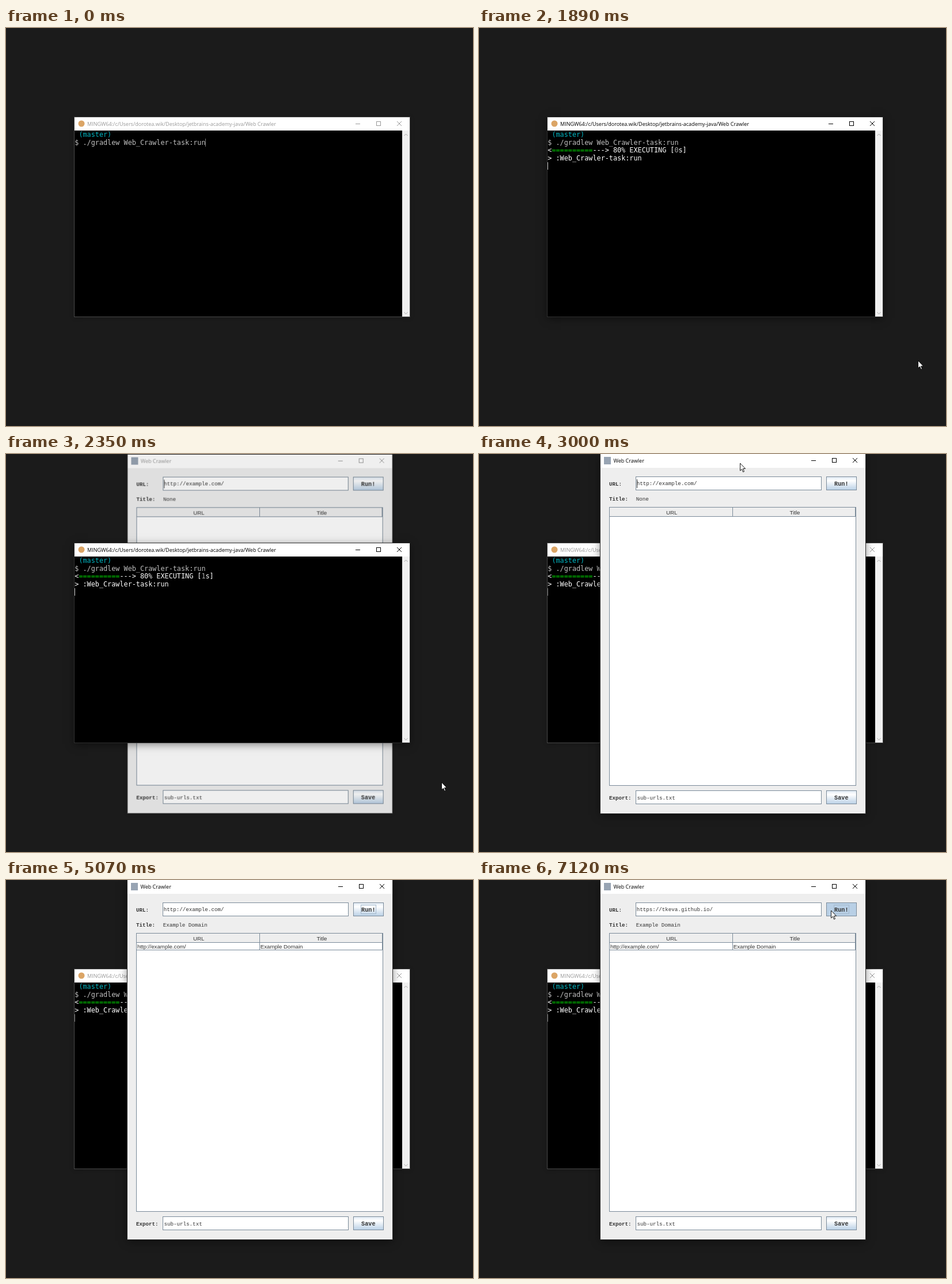
An HTML page with a canvas that plays this animation: 811 px wide and 691 px high, repeating every 8 s.

```html
<!DOCTYPE html>
<html lang="en">
<head>
<meta charset="utf-8">
<title>Web Crawler</title>
<style>
html, body { margin: 0; width: 100%; height: 100%; overflow: hidden; background: #1b1b1b; }
canvas { display: block; }
</style>
</head>
<body>
<canvas id="stage" width="811" height="691"></canvas>
<script>
const W = 811, H = 691, LOOP = 8000;
const stage = document.getElementById('stage').getContext('2d');
const layerCanvas = document.createElement('canvas');
layerCanvas.width = W;
layerCanvas.height = H;
const layer = layerCanvas.getContext('2d');

const UI = '9.03px "Open Sans", "Noto Sans", sans-serif';
const TERM = '11.8px "DejaVu Sans Mono", monospace';
const MONO = '9.2px "Liberation Mono", monospace';
const MONO_BOLD = 'bold 9.2px "Liberation Mono", monospace';
const BUTTON = 'bold 10.2px "Liberation Mono", monospace';
const CELL = '9.7px "Liberation Sans", sans-serif';
const EDGE = '#7a8a99', PICK = '#b8cfe5', INK = '#333';
const COL = 7.1, CHAR = 5.52;

const TITLE = 'MINGW64:/c/Users/dorotea.wik/Desktop/jetbrains-academy-java/Web Crawler';
const FIRST_URL = 'http://example.com/';
const NEXT_URL = 'https://tkeva.github.io/';

// Pointer moves: start, end, number of steps, waypoints.
const MOVES = [
  [1490, 1990, 9, [[810, 658], [780, 600], [756, 570]]],
  [2530, 3000, 10, [[756, 570], [640, 330], [453, 16]]],
  [3160, 3820, 13, [[453, 16], [550, 40], [622, 54]]],
  [4700, 5070, 8, [[622, 54], [653, 84], [600, 119], [556, 90], [558, 58]]],
  [6530, 7070, 11, [[219, 51], [400, 53], [611, 53]]]
];

const between = (t, a, b) => t >= a && t < b;
const ease = p => p * p * (3 - 2 * p);

function stepped(t, start, end, n) {
  const k = Math.floor((t - start) / (end - start) * (n - 1) + 1e-6) + 1;
  return Math.max(0, Math.min(1, k / n));
}

function along(points, p) {
  const x = p * (points.length - 1);
  const i = Math.min(Math.floor(x), points.length - 2), f = x - i;
  return [0, 1].map(d => points[i][d] + (points[i + 1][d] - points[i][d]) * f);
}

function box(c, x, y, w, h, fill, stroke) {
  c.fillStyle = fill;
  c.fillRect(x, y, w, h);
  if (stroke) {
    c.strokeStyle = stroke;
    c.lineWidth = 1;
    c.strokeRect(x + .5, y + .5, w - 1, h - 1);
  }
}

function text(c, s, x, y, font, color, align = 'left') {
  c.font = font;
  c.fillStyle = color;
  c.textAlign = align;
  c.fillText(s, x, y);
}

function lines(c, color, ...paths) {
  c.strokeStyle = color;
  c.lineWidth = 1;
  c.beginPath();
  for (const path of paths) path.forEach(([x, y], i) => i ? c.lineTo(x, y) : c.moveTo(x, y));
  c.stroke();
}

function frame(c, x, y, w, h, active) {
  c.save();
  c.shadowColor = `rgba(0,0,0,${active ? .5 : .25})`;
  c.shadowBlur = active ? 14 : 8;
  c.shadowOffsetY = active ? 3 : 1;
  box(c, x, y, w, h, '#fff');
  c.restore();
  c.strokeStyle = active ? '#303030' : '#4a4a4a';
  c.strokeRect(x - .5, y - .5, w + 1, h + 1);
}

function controls(c, x, y, color) {
  lines(c, color, [[x - 4, y + .5], [x + 4, y + .5]]);
  c.strokeRect(x + 32.5, y - 3.5, 7, 7);
  lines(c, color, [[x + 68, y - 4], [x + 76, y + 4]], [[x + 76, y - 4], [x + 68, y + 4]]);
}

function termLine(row, runs) {
  let col = 0;
  for (const [s, color] of runs) {
    text(stage, s, 119.3 + col * COL, 189 + row * 13.5, TERM, color);
    col += s.length;
  }
}

function termCaret(t) {
  const active = between(t, 120, 3000);
  const color = active ? '#bfbfbf' : '#777';
  if (t < 450) box(stage, 346, 192, 1, 14, color);
  else if (between(t, 540, 840) || between(t, 1210, 1490)) box(stage, 119, 206, 1, 13, color);
  else if (t >= 1490) box(stage, 119, 233, 1, 13, color);
}

function terminal(t) {
  const active = between(t, 120, 3000);
  frame(stage, 119, 155, 582, 346, active);
  box(stage, 119, 178, 569, 323, '#000');
  box(stage, 688, 178, 13, 323, '#f0f0f0');
  lines(stage, '#a8a8a8', [[691.5, 187], [694.5, 184], [697.5, 187]], [[691.5, 493.5], [694.5, 496.5], [697.5, 493.5]]);
  stage.fillStyle = '#dba566';
  stage.beginPath();
  stage.arc(131, 166, 5.5, 0, 7);
  stage.fill();
  text(stage, TITLE, 141, 169.5, UI, active ? '#000' : '#999');
  controls(stage, 611, 166, active ? '#000' : '#999');

  termLine(0, [[' (master)', '#00b4c0']]);
  termLine(1, [['$ ./gradlew Web_Crawler-task:run', '#bfbfbf']]);
  if (t >= 1490) {
    termLine(2, [['<', '#fff'], ['==========', '#00bf00'], ['---> 80% EXECUTING [', '#fff'],
      [t < 1990 ? '0' : '1', '#aaa'], ['s]', '#fff']]);
    termLine(3, [['> :Web_Crawler-task:run', '#fff']]);
  }
  termCaret(t);
}

function button(label, y, pressed, focused) {
  const g = layer.createLinearGradient(0, y, 0, y + 24);
  g.addColorStop(0, '#dde8f3');
  g.addColorStop(.3, '#fff');
  g.addColorStop(1, PICK);
  box(layer, 603, y, 53, 24, pressed ? PICK : g, EDGE);
  if (focused) {
    layer.strokeStyle = '#a3b8cc';
    layer.strokeRect(616.5, y + 4.5, 26, 15);
  }
  text(layer, label, 629.3, y + 15.8, BUTTON, INK, 'center');
}

function app(t) {
  const c = layer;
  const active = t >= 3000 && !between(t, 5370, 5710);
  const done = t >= 4310;
  const editing = between(t, 5750, 7120);
  const pressed = between(t, 3820, 4310) || t >= 7120;
  const url = t >= 6480 ? NEXT_URL : FIRST_URL;
  c.clearRect(0, 0, W, H);
  frame(c, 211, 0, 460, 624, active);
  box(c, 211, 24, 460, 600, '#eee');
  box(c, 217, 5, 12, 13, '#98a4b3');
  text(c, 'Web Crawler', 233.5, 15, UI, active ? '#000' : '#999');
  controls(c, 581, 11, active ? '#000' : '#999');

  text(c, 'URL:', 226, 55, MONO_BOLD, INK);
  box(c, 272, 39, 323, 24, '#fff', EDGE);
  if (between(t, 5750, 6480)) {
    const w = stepped(t, 5750, 6300, 12) * FIRST_URL.length * CHAR;
    box(c, 274 + FIRST_URL.length * CHAR - w, 44, w, 14, PICK);
  }
  text(c, url, 273.7, 54.3, MONO, INK);
  if (t < 3820) box(c, 274, 44, 1, 15, INK);
  if (between(t, 6480, 7120)) box(c, 274 + NEXT_URL.length * CHAR, 44, 1, 15, INK);
  button('Run!', 39, pressed, t >= 3820 && !editing);

  text(c, 'Title:', 226, 81, MONO_BOLD, INK);
  text(c, done ? 'Example Domain' : 'None', 272.7, 81, MONO, INK);

  box(c, 226, 92, 429, 484, '#fff', EDGE);
  box(c, 227, 93, 427, 15, '#eee');
  lines(c, EDGE, [[227, 108.5], [654, 108.5]], [[440.5, 93], [440.5, 109]], [[653.5, 93], [653.5, 109]]);
  text(c, 'URL', 334.7, 105, CELL, INK, 'center');
  text(c, 'Title', 548.5, 105, CELL, INK, 'center');
  if (done) {
    lines(c, EDGE, [[227, 121.5], [653.5, 121.5], [653.5, 108]], [[440.5, 108], [440.5, 121]]);
    text(c, FIRST_URL, 228, 118.5, CELL, INK);
    text(c, 'Example Domain', 441.7, 118.5, CELL, INK);
  }

  text(c, 'Export:', 226, 600, MONO_BOLD, INK);
  box(c, 272, 584, 323, 24, '#fff', EDGE);
  text(c, 'sub-urls.txt', 274.5, 599.5, MONO, INK);
  button('Save', 584, false, false);

  // Opening: fade in while growing to full size.
  const now = [2230, 2280, 2350, 2390].filter(s => s <= t).pop();
  const u = (now - 2230) / 160;
  const scale = 1 - .03 * (1 - u) ** 2;
  stage.save();
  stage.globalAlpha = Math.min(1, .43 + (now - 2230) / 240);
  stage.translate(441, 312);
  stage.scale(scale, scale);
  stage.translate(-441, -312);
  stage.drawImage(layerCanvas, 0, 0);
  stage.restore();
}

function pointer(t) {
  const move = MOVES.filter(m => m[0] <= t).pop();
  if (!move || between(t, 5070, 6530)) return;
  const [start, end, n, points] = move;
  const [x, y] = along(points, ease(stepped(t, start, end, n)));
  const inField = t >= 3000 && x > 272 && x < 595 && y > 39 && y < 63;
  if (inField) return;
  stage.save();
  stage.translate(x + .5, y);
  stage.beginPath();
  for (const [px, py] of [[0, 0], [0, 13], [3, 10.3], [5, 15.2], [7, 14.4], [5, 9.6], [9, 9.4]]) stage.lineTo(px, py);
  stage.closePath();
  stage.fillStyle = '#fff';
  stage.fill();
  stage.strokeStyle = '#000';
  stage.lineWidth = .9;
  stage.stroke();
  stage.restore();
}

function draw(t) {
  box(stage, 0, 0, W, H, '#1b1b1b');
  const open = t >= 2230, front = t >= 3000;
  if (open && !front) app(t);
  terminal(t);
  if (front) app(t);
  pointer(t);
}

const begin = performance.now();
function tick() {
  draw((performance.now() - begin) % LOOP);
  requestAnimationFrame(tick);
}
tick();
</script>
</body>
</html>
```
